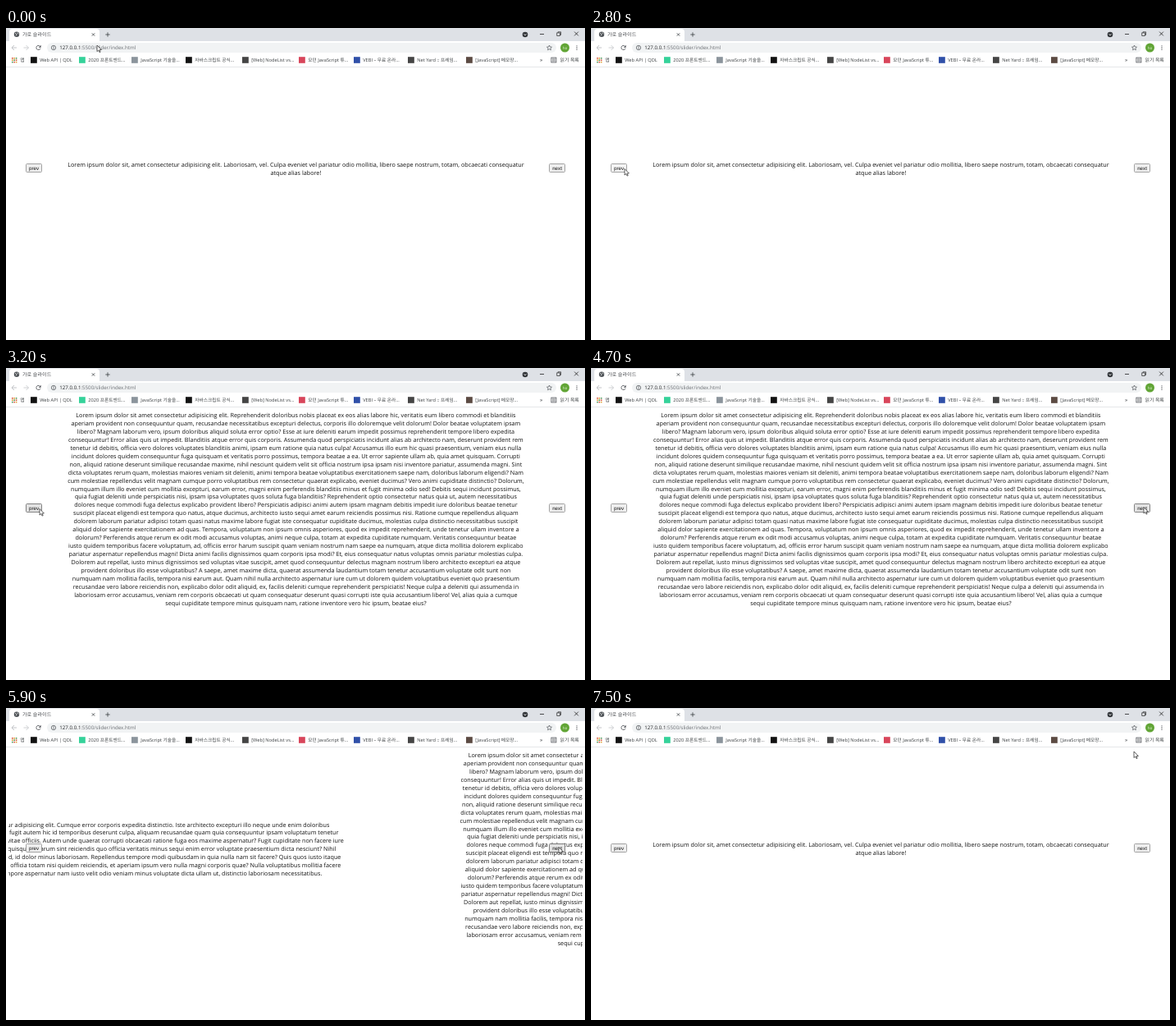
Write an HTML page with a canvas that moves like this. It is 706 px wide and 380 px high and loops after 7.6 s.

```html
<!DOCTYPE html>
<html lang="ko">
<head>
<meta charset="utf-8">
<title>가로 슬라이드</title>
<style>
html, body { margin: 0; width: 100%; height: 100%; overflow: hidden; background: #fff; }
canvas { display: block; width: 706px; height: 380px; }
</style>
</head>
<body>
<canvas id="stage"></canvas>
<script>
const W = 706, H = 380, LOOP = 7600, STEP = 100;
const SLIDE_W = 700, LINE = 9.96, MID_X = 353.4, MID_Y = 171.8;
const UI = '"Open Sans", "Noto Sans CJK KR", "Noto Sans CJK", sans-serif';
const ARIAL = '"Liberation Sans", Arial, sans-serif';

const canvas = document.getElementById('stage');
const ctx = canvas.getContext('2d');
const dpr = window.devicePixelRatio || 1;
canvas.width = W * dpr;
canvas.height = H * dpr;

// Each slide: alignment, lines, and optional x anchors per line
const slides = [
  { align: 'center', lines: [
    'Lorem ipsum dolor sit, amet consectetur adipisicing elit. Laboriosam, vel. Culpa eveniet vel pariatur odio mollitia, libero saepe nostrum, totam, obcaecati consequatur',
    'atque alias labore!'
  ] },
  { align: 'left', x: [78, 83, 82.5, 80, 144], lines: [
    'Lorem ipsum dolor sit amet consectetur adipisicing elit. Sapiente amet aliquid fugit, earum quidem nostrum voluptas dolores autem, rerum minima libero sequi at eveniet',
    'tempore blanditiis ex consequuntur aliquam quasi deserunt eveniet ab dolore, nobis eos quia ipsum harum fugiat. Nemo velit odio, tenetur culpa iste repellat',
    'provident ratione, enim laborum corporis adipisci consectetur quasi eos recusandae dolorem, sint eaque minus. Fuga ipsa quos modi natus, saepe omnis',
    'reprehenderit at ducimus iure aliquam? Nostrum sed ex ut hic inventore? Earum voluptatem quas illo perferendis, magni cumque delectus esse nihil labore',
    'veniam incidunt reprehenderit rerum deserunt obcaecati alias quas adipisci, totam error vero dolor iusto!'
  ] },
  { align: 'right', x: [616, 627, 633.5, 624, 630, 630, 607], lines: [
    'Lorem ipsum dolor sit amet consectetur adipisicing elit. Cumque error corporis expedita distinctio. Iste architecto excepturi illo neque unde enim doloribus',
    'quos maxime, velit sapiente nobis harum ea, fugit autem hic id temporibus deserunt culpa, aliquam recusandae quam quia consequuntur ipsam voluptatum tenetur',
    'dolore minima eveniet, sequi beatae rerum vitae officiis. Autem unde quaerat corrupti obcaecati ratione fuga eos maxime aspernatur? Fugit cupiditate non facere iure',
    'modi. Eligendi saepe eaque libero at quisquam earum sint reiciendis quo officia veritatis minus sequi enim error voluptate praesentium dicta nesciunt? Nihil',
    'soluta ab, porro animi laborum est ipsa quod, id dolor minus laboriosam. Repellendus tempore modi quibusdam in quia nulla nam sit facere? Quis quos iusto itaque',
    'eius numquam, alias vel fugiat. Possimus officia totam nisi quidem reiciendis, et aperiam ipsum vero nulla magni corporis quae? Nulla voluptatibus mollitia facere',
    'omnis quas natus debitis, tempore aspernatur nam iusto velit odio veniam minus voluptate dicta ullam ut, distinctio laboriosam necessitatibus.'
  ] },
  { align: 'center', lines: [
    'Lorem ipsum dolor sit amet consectetur adipisicing elit. Reprehenderit doloribus nobis placeat ex eos alias labore hic, veritatis eum libero commodi et blanditiis',
    'aperiam provident non consequuntur quam, recusandae necessitatibus excepturi delectus, corporis illo doloremque velit dolorum! Dolor beatae voluptatem ipsam',
    'libero? Magnam laborum vero, ipsum doloribus aliquid soluta error optio? Esse at iure deleniti earum impedit possimus reprehenderit tempore libero expedita',
    'consequuntur! Error alias quis ut impedit. Blanditiis atque error quis corporis. Assumenda quod perspiciatis incidunt alias ab architecto nam, deserunt provident rem',
    'tenetur id debitis, officia vero dolores voluptates blanditiis animi, ipsam eum ratione quia natus culpa! Accusamus illo eum hic quasi praesentium, veniam eius nulla',
    'incidunt dolores quidem consequuntur fuga quisquam et veritatis porro possimus, tempora beatae a ea. Ut error sapiente ullam ab, quia amet quisquam. Corrupti',
    'non, aliquid ratione deserunt similique recusandae maxime, nihil nesciunt quidem velit sit officia nostrum ipsa ipsam nisi inventore pariatur, assumenda magni. Sint',
    'dicta voluptates rerum quam, molestias maiores veniam sit deleniti, animi tempora beatae voluptatibus exercitationem saepe nam, doloribus laborum eligendi? Nam',
    'cum molestiae repellendus velit magnam cumque porro voluptatibus rem consectetur quaerat explicabo, eveniet ducimus? Vero animi cupiditate distinctio? Dolorum,',
    'numquam illum illo eveniet cum mollitia excepturi, earum error, magni enim perferendis blanditiis minus et fugit minima odio sed! Debitis sequi incidunt possimus,',
    'quia fugiat deleniti unde perspiciatis nisi, ipsam ipsa voluptates quos soluta fuga blanditiis? Reprehenderit optio consectetur natus quia ut, autem necessitatibus',
    'dolores neque commodi fuga delectus explicabo provident libero? Perspiciatis adipisci animi autem ipsam magnam debitis impedit iure doloribus beatae tenetur',
    'suscipit placeat eligendi est tempora quo natus, atque ducimus, architecto iusto sequi amet earum reiciendis possimus nisi. Ratione cumque repellendus aliquam',
    'dolorem laborum pariatur adipisci totam quasi natus maxime labore fugiat iste consequatur cupiditate ducimus, molestias culpa distinctio necessitatibus suscipit',
    'aliquid dolor sapiente exercitationem ad quas. Tempora, voluptatum non ipsum omnis asperiores, quod ex impedit reprehenderit, unde tenetur ullam inventore a',
    'dolorum? Perferendis atque rerum ex odit modi accusamus voluptas, animi neque culpa, totam at expedita cupiditate numquam. Veritatis consequuntur beatae',
    'iusto quidem temporibus facere voluptatum, ad, officiis error harum suscipit quam veniam nostrum nam saepe ea numquam, atque dicta mollitia dolorem explicabo',
    'pariatur aspernatur repellendus magni! Dicta animi facilis dignissimos quam corporis ipsa modi? Et, eius consequatur natus voluptas omnis pariatur molestias culpa.',
    'Dolorem aut repellat, iusto minus dignissimos sed voluptas vitae suscipit, amet quod consequuntur delectus magnam nostrum libero architecto excepturi ea atque',
    'provident doloribus illo esse voluptatibus? A saepe, amet maxime dicta, quaerat assumenda laudantium totam tenetur accusantium voluptate odit sunt non',
    'numquam nam mollitia facilis, tempora nisi earum aut. Quam nihil nulla architecto aspernatur iure cum ut dolorem quidem voluptatibus eveniet quo praesentium',
    'recusandae vero labore reiciendis non, explicabo dolor odit aliquid, ex, facilis deleniti cumque reprehenderit perspiciatis! Neque culpa a deleniti qui assumenda in',
    'laboriosam error accusamus, veniam rem corporis obcaecati ut quam consequatur deserunt quasi corrupti iste quia accusantium libero! Vel, alias quia a cumque',
    'sequi cupiditate tempore minus quisquam nam, ratione inventore vero hic ipsum, beatae eius?'
  ] }
];

const bookmarks = [
  [30, '#111', 'Web API | QDL'],
  [89, '#35d29a', '2020 프론트엔드...'],
  [153, '#8b949c', 'JavaScript 기술을...'],
  [219, '#111', '자바스크립트 공식...'],
  [288, '#444', '[Web] NodeList vs...'],
  [357, '#d8455a', '모던 JavaScript 튜...'],
  [424, '#2f4fa8', 'VEBI – 무료 온라...'],
  [490, '#444', 'Net Yard :: 프레임...'],
  [561, '#5b4a42', '[JavaScript] 메모장...']
];

// Pointer path: time, x, y
const path = [
  [0, 111, 21], [800, 296, 237], [1100, 200, 266], [1600, 42, 171], [1700, 41, 171.5],
  [3500, 41, 171.5], [3900, 320, 201], [4300, 687, 186], [4700, 674, 169.5],
  [6100, 674, 169.5], [6400, 656, 185], [6900, 648, 120], [7300, 671, 70], [7500, 662, 53]
];

const clamp = v => Math.max(0, Math.min(1, v));
const ramp = (t, start) => clamp((t - start) / 338);
const trackPos = t => 3 * SLIDE_W * (ramp(t, 2830) - ramp(t, 5823));

function pointer(t) {
  let i = 1;
  while (i < path.length - 1 && path[i][0] < t) i++;
  const [t0, x0, y0] = path[i - 1], [t1, x1, y1] = path[i];
  const k = clamp((t - t0) / (t1 - t0));
  return [x0 + (x1 - x0) * k, y0 + (y1 - y0) * k];
}

// Large font scaled down keeps glyph advances unrounded
function text(str, x, y, size, color, align = 'left', family = UI) {
  ctx.save();
  ctx.translate(x, y);
  ctx.scale(0.1, 0.1);
  ctx.font = `${size * 10}px ${family}`;
  ctx.textRendering = 'geometricPrecision';
  ctx.textAlign = align;
  ctx.fillStyle = color;
  ctx.fillText(str, 0, 0);
  ctx.restore();
}

function rect(x, y, w, h, color) {
  ctx.fillStyle = color;
  ctx.fillRect(x, y, w, h);
}

function round(x, y, w, h, r, color) {
  ctx.beginPath();
  ctx.roundRect(x, y, w, h, r);
  ctx.fillStyle = color;
  ctx.fill();
}

function dot(x, y, r, color) {
  ctx.beginPath();
  ctx.arc(x, y, r, 0, 7);
  ctx.fillStyle = color;
  ctx.fill();
}

function line(points, color, width = 0.8) {
  ctx.beginPath();
  points.forEach(([x, y]) => ctx.lineTo(x, y));
  ctx.strokeStyle = color;
  ctx.lineWidth = width;
  ctx.stroke();
}

function ring(x, y, r, color, from = 0, to = 7) {
  ctx.beginPath();
  ctx.arc(x, y, r, from, to);
  ctx.strokeStyle = color;
  ctx.lineWidth = 0.8;
  ctx.stroke();
}

function cross(x, y, r, color) {
  line([[x - r, y - r], [x + r, y + r]], color);
  line([[x + r, y - r], [x - r, y + r]], color);
}

function arrow(x, y, dir, color) {
  line([[x - 3 * dir, y], [x + 3 * dir, y]], color);
  line([[x, y - 3], [x + 3 * dir, y], [x, y + 3]], color);
}

function tabStrip() {
  rect(0, 0, W, 16, '#dee1e6');
  round(4, 1, 110, 18, 4, '#fff');
  dot(13, 7.7, 3.2, '#505458');
  line([[11, 6.2], [13, 7.4], [12.2, 9.4]], '#fff', 0.7);
  line([[14, 5.4], [15, 7.4]], '#fff', 0.7);
  text('가로 슬라이드', 20, 10, 6.1, '#4a4d51');
  cross(106.5, 8, 1.7, '#3c4043');
  line([[121.3, 8], [126.7, 8]], '#3c4043');
  line([[124, 5.3], [124, 10.7]], '#3c4043');
  dot(633, 8, 3.3, '#35383c');
  line([[631.6, 7.4], [633, 8.9], [634.4, 7.4]], '#fff', 0.9);
  line([[651, 7.5], [656, 7.5]], '#222');
  ctx.strokeStyle = '#222';
  ctx.lineWidth = 0.7;
  ctx.strokeRect(671.8, 5.9, 3.6, 3.6);
  line([[673, 5.7], [673, 4.8], [676.6, 4.8], [676.6, 8.4], [675.6, 8.4]], '#222', 0.7);
  cross(695.5, 7, 2.4, '#222');
}

function toolbar() {
  rect(0, 16, W, 31, '#fff');
  arrow(10, 24, -1, '#b4b7ba');
  arrow(24.5, 24, 1, '#c3c5c8');
  ring(39.5, 24, 2.6, '#4d5156', 0.3, 5.6);
  ctx.beginPath();
  ctx.moveTo(42.6, 20.8);
  ctx.lineTo(42.6, 23.7);
  ctx.lineTo(39.8, 23.7);
  ctx.fillStyle = '#4d5156';
  ctx.fill();
  round(50, 18, 621, 12, 6, '#f1f3f4');
  ring(58, 24, 2.7, '#5f6368');
  rect(57.6, 23.4, 0.9, 2.2, '#5f6368');
  rect(57.6, 22, 0.9, 0.9, '#5f6368');
  text('127.0.0.1', 65.3, 26.3, 6.18, '#202124');
  text(':5500/slider/index.html', 91.4, 26.3, 6.18, '#686c71');
  const star = [];
  for (let i = 0; i <= 10; i++) {
    const a = -Math.PI / 2 + i * Math.PI / 5, r = i % 2 ? 1.5 : 3.2;
    star.push([662.5 + r * Math.cos(a), 24.2 + r * Math.sin(a)]);
  }
  line(star, '#4d5156', 0.7);
  dot(681.5, 24, 5.5, '#62a536');
  text('ho', 681.5, 25.7, 4.6, '#e8f4de', 'center');
  for (const dy of [-2.2, 0, 2.2]) dot(696, 24 + dy, 0.65, '#4d5156');
}

function bookmarkBar() {
  const colors = ['#d9503f', '#e0a030', '#4c9a5a'];
  for (let i = 0; i < 9; i++) {
    const col = i % 3, row = (i - col) / 3;
    rect(7 + col * 2.4, 36 + row * 2.4, 1.6, 1.6, colors[(col + row) % 3]);
  }
  text('앱', 17.3, 41.2, 5.9, '#3c4043');
  for (const [x, color, label] of bookmarks) {
    rect(x, 35.2, 7.8, 7.6, color);
    text(label, x + 11.2, 41.1, 5.7, '#3c4043');
  }
  text('»', 651, 41, 6.5, '#3c4043');
  ctx.strokeStyle = '#4d5156';
  ctx.lineWidth = 0.8;
  ctx.strokeRect(664.9, 36.1, 6, 5.8);
  for (const y of [37.8, 39, 40.2]) line([[666, y], [669.8, y]], '#4d5156', 0.6);
  text('읽기 목록', 675.5, 41.1, 5.9, '#3c4043');
  rect(0, 47, W, 0.8, '#dfe1e4');
}

function drawSlides(t) {
  const pos = trackPos(t);
  ctx.save();
  ctx.beginPath();
  ctx.rect(3, 48, SLIDE_W, H - 48);
  ctx.clip();
  slides.forEach((s, i) => {
    const off = i * SLIDE_W - pos;
    if (Math.abs(off) >= SLIDE_W) return;
    const top = MID_Y + 2.6 - (s.lines.length - 1) / 2 * LINE;
    s.lines.forEach((str, n) => {
      text(str, off + (s.x ? s.x[n] : MID_X), top + n * LINE, 7.23, '#111', s.align);
    });
  });
  ctx.restore();
}

function button(label, x, [px, py], pressed) {
  const y = 165.5, w = 19, h = 10;
  const over = px >= x && px <= x + w && py >= y && py <= y + h;
  ctx.beginPath();
  ctx.roundRect(x, y, w, h, 1);
  ctx.fillStyle = pressed ? '#f5f5f5' : over ? '#e3e3e3' : '#efefef';
  ctx.fill();
  ctx.strokeStyle = over && !pressed ? '#757575' : '#989898';
  ctx.lineWidth = 0.9;
  ctx.stroke();
  text(label, x + w / 2, 172.7, 6.2, '#111', 'center', ARIAL);
}

function drawPointer([x, y]) {
  const shape = [[0, 0], [0, 7.6], [1.8, 6], [3, 8.6], [4.2, 8.1], [3, 5.6], [5.4, 5.5]];
  ctx.beginPath();
  shape.forEach(([dx, dy]) => ctx.lineTo(x + dx, y + dy));
  ctx.closePath();
  ctx.fillStyle = '#fff';
  ctx.fill();
  ctx.strokeStyle = '#222';
  ctx.lineWidth = 0.7;
  ctx.stroke();
}

function draw(t) {
  const p = pointer(t);
  ctx.setTransform(dpr, 0, 0, dpr, 0, 0);
  rect(0, 0, W, H, '#fff');
  tabStrip();
  toolbar();
  bookmarkBar();
  drawSlides(t);
  button('prev', 24.5, p, t === 2800);
  button('next', 662.5, p, t === 5700);
  drawPointer(p);
}

const begin = performance.now();
let last = -1;
function tick() {
  const t = Math.floor((performance.now() - begin) % LOOP / STEP) * STEP;
  if (t !== last) draw(last = t);
  requestAnimationFrame(tick);
}
tick();
</script>
</body>
</html>
```
